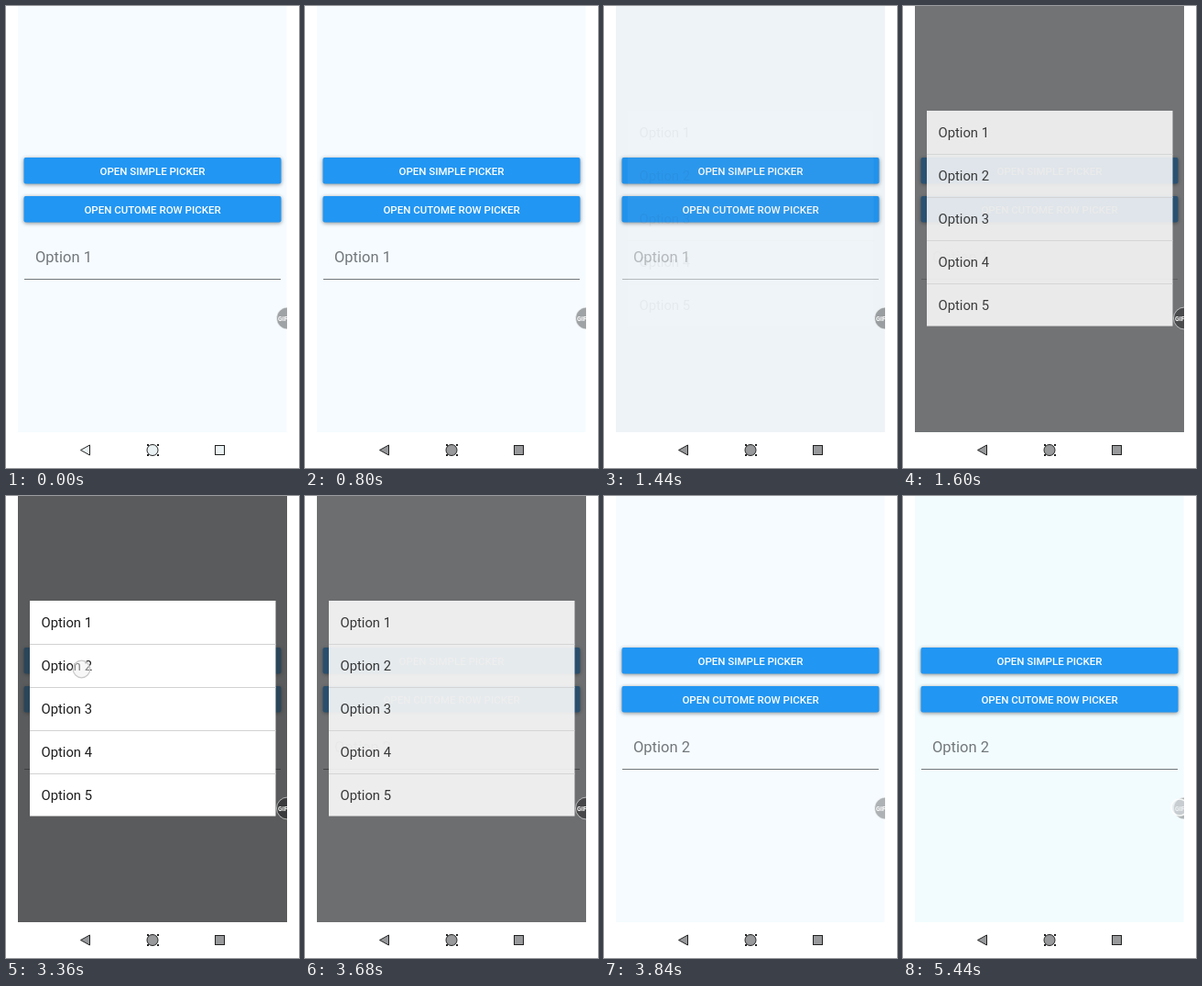
An HTML page with a canvas that plays this animation: 320 by 503 pixels, repeating every 5.6 s.

```html
<!DOCTYPE html>
<html lang="en">
<head>
<meta charset="utf-8">
<title>Option picker</title>
<style>
html, body { margin: 0; width: 100%; height: 100%; overflow: hidden; background: #fff; }
canvas { display: block; width: 320px; height: 503px; }
</style>
</head>
<body>
<canvas id="stage" width="320" height="503"></canvas>
<script>
const ctx = document.getElementById('stage').getContext('2d');
const LOOP = 5600, STEP = 160;
const FONT = 'Roboto, Arial, sans-serif';

function rect(x, y, w, h, color) {
  ctx.fillStyle = color;
  ctx.fillRect(x, y, w, h);
}

function label(text, x, y, size, color, weight = 400, align = 'left') {
  ctx.font = `${weight} ${size}px ${FONT}`;
  ctx.textAlign = align;
  ctx.fillStyle = color;
  ctx.fillText(text, x, y);
}

function disc(x, y, r, fill, stroke, width = 1) {
  ctx.beginPath();
  ctx.arc(x, y, r, 0, Math.PI * 2);
  ctx.fillStyle = fill;
  ctx.fill();
  if (stroke) {
    ctx.strokeStyle = stroke;
    ctx.lineWidth = width;
    ctx.stroke();
  }
}

function button(text, y) {
  ctx.save();
  ctx.shadowColor = 'rgba(0,0,0,.45)';
  ctx.shadowBlur = 4;
  ctx.shadowOffsetY = 1;
  ctx.fillStyle = '#2196f3';
  ctx.beginPath();
  ctx.roundRect(19.5, y, 281, 28.5, 2);
  ctx.fill();
  ctx.restore();
  label(text, 160, y + 19, 11.5, '#fff', 500, 'center');
}

function field(text, alpha) {
  ctx.save();
  ctx.globalAlpha = alpha;
  label(text, 32, 279, 16.5, '#72777a');
  rect(20, 297, 280, 1, '#72777a');
  ctx.restore();
}

function dialog(alpha) {
  if (!alpha) return;
  ctx.save();
  ctx.globalAlpha = alpha;
  rect(13, 0, 294, 464, 'rgba(47,47,47,.78)');
  rect(26, 114, 268.5, 234.5, '#fff');
  for (let i = 0; i < 5; i++) {
    const y = 114 + i * 47;
    if (i) rect(26, y, 268.5, 1, '#d2d2d2');
    label('Option ' + (i + 1), 38.5, y + 29, 14.8, '#1c1c1c');
  }
  ctx.restore();
}

function bubble(shade, touched) {
  ctx.save();
  ctx.beginPath();
  ctx.rect(13, 0, 294, 464);
  ctx.clip();
  disc(307.5, 340, 12, `rgba(0,0,0,${shade})`, 'rgba(255,255,255,.6)');
  label('GIF', 297, 343, 7, '#fff', 700);
  if (touched) disc(302, 339, 9, 'rgba(225,232,236,.5)', 'rgba(255,255,255,.85)', 1.5);
  ctx.restore();
}

function navBar(fill) {
  ctx.strokeStyle = '#222';
  ctx.lineWidth = 1;
  ctx.fillStyle = fill;
  ctx.beginPath();
  ctx.moveTo(81.5, 483.5);
  ctx.lineTo(91.5, 478);
  ctx.lineTo(91.5, 489);
  ctx.closePath();
  ctx.fill();
  ctx.stroke();
  for (const dx of [-6, 5]) for (const dy of [-6, 5]) rect(160 + dx, 483 + dy, 2, 2, '#222');
  disc(160, 483.5, 6, fill, '#222');
  ctx.fillStyle = fill;
  ctx.fillRect(228.5, 478.5, 10, 10);
  ctx.strokeRect(228.5, 478.5, 10, 10);
}

function fade(t) {
  if (t < 1440 || t >= 3840) return 0;
  if (t < 1600) return 0.045;
  if (t < 1760) return 0.85;
  return t < 3680 ? 1 : 0.88;
}

function draw(t) {
  const chosen = t >= 3680;
  const tail = t >= 5440;
  const pressed = t >= 1440 && t < 1760;
  const grey = Math.min(1, Math.floor(t / STEP) / 3);
  const mix = (a, b) => Math.round(a + (b - a) * grey);

  rect(0, 0, 320, 503, '#fff');
  rect(13, 0, 293.5, 464, tail ? '#f2fcfe' : '#f5fbff');
  button('OPEN SIMPLE PICKER', 165);
  button('OPEN CUTOME ROW PICKER', 207);
  field('Option ' + (chosen ? 2 : 1), pressed ? 0.48 : 1);
  dialog(fade(t));
  if (t >= 3360 && t < 3680) disc(82.5, 188.5, 9.3, 'rgba(240,240,240,.5)', '#c9c9c9', 1.3);
  bubble(t >= 3840 ? 0.29 : 0.35, tail);
  navBar(`rgb(${mix(234, 151)},${mix(242, 153)},${mix(244, 155)})`);
}

const start = performance.now();
function frame() {
  draw((performance.now() - start) % LOOP);
  requestAnimationFrame(frame);
}
frame();
</script>
</body>
</html>
```
